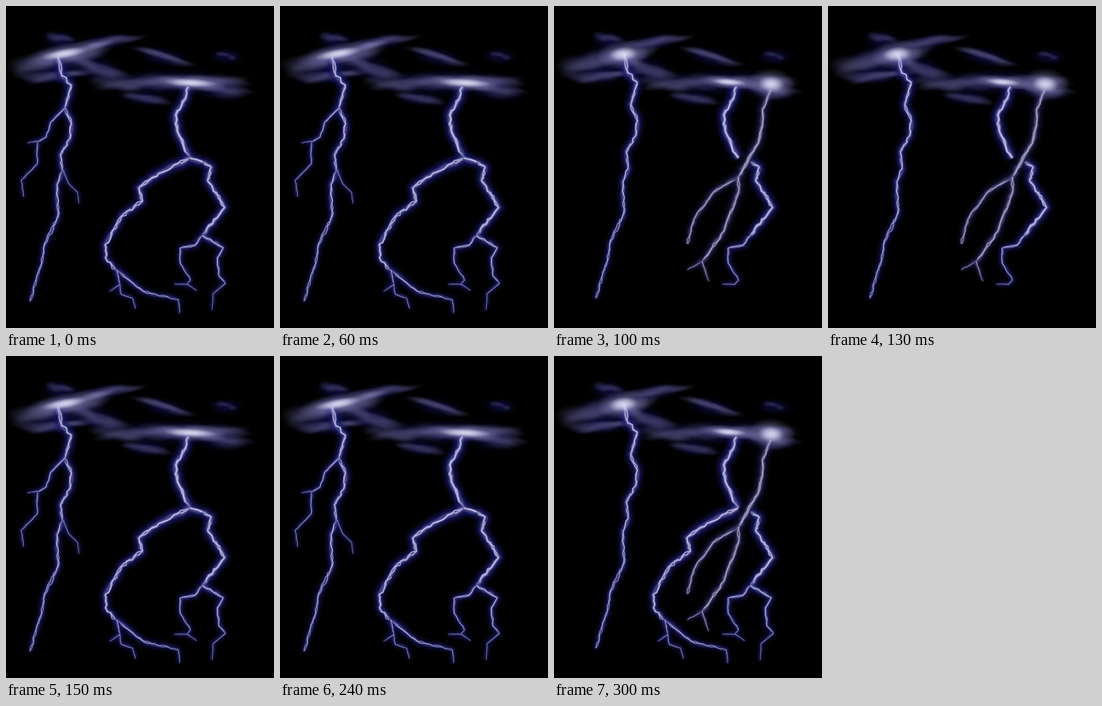
These frames come from a looping animation (360 by 432 pixels, 330 ms). An HTML page with a canvas:

```html
<!DOCTYPE html>
<html lang="en">
<head>
<meta charset="utf-8">
<title>Lightning</title>
<style>
html, body { margin: 0; height: 100%; overflow: hidden; background: #000; }
canvas { display: block; }
</style>
</head>
<body>
<canvas id="stage" width="360" height="432"></canvas>
<script>
const view = document.getElementById('stage').getContext('2d');
const HAZE = '92,88,134', FRINGE = '16,16,84', GLOW = '150,146,200', HOT = '236,234,255';
const BLUE = ['rgba(22,22,100,.75)', 'rgba(84,82,146,.85)', 'rgba(188,186,228,.8)'];
const GREY = ['rgba(28,26,74,.6)', 'rgba(82,78,122,.85)', 'rgba(166,163,196,.75)'];
let ctx, seed;

function random() {
  seed = (seed * 16807) % 2147483647;
  return seed / 2147483647 - 0.5;
}

// Soft ellipse
function puff(x, y, rx, ry, tilt, rgb, alpha) {
  ctx.save();
  ctx.translate(x, y);
  ctx.rotate(tilt);
  ctx.scale(rx, ry);
  const g = ctx.createRadialGradient(0, 0, 0, 0, 0, 1);
  for (let k = 0; k <= 1; k += 0.25) {
    g.addColorStop(k, `rgba(${rgb},${alpha * (1 - k * k) ** 1.5})`);
  }
  ctx.fillStyle = g;
  ctx.fillRect(-1, -1, 2, 2);
  ctx.restore();
}

// Wisps scattered along a line, with a dark blue rim
function wisps(x1, y1, x2, y2, thick) {
  const len = Math.hypot(x2 - x1, y2 - y1), tilt = Math.atan2(y2 - y1, x2 - x1);
  const n = Math.ceil(len / 9), rx = Math.min(26, len / 2);
  puff((x1 + x2) / 2, (y1 + y2) / 2, len / 2 + 16, thick * 1.9, tilt, FRINGE, .6);
  seed = 4321 + x1 * 7;
  for (let i = 0; i <= n; i++) {
    const k = i / n;
    puff(x1 + (x2 - x1) * k, y1 + (y2 - y1) * k + random() * thick,
      rx * (1 + random() * .4), thick * (.8 + random() * .5), tilt + random() * .3, HAZE, .32);
  }
}

function clouds() {
  wisps(24, 84, 126, 58, 13);
  wisps(62, 44, 84, 46, 7);
  wisps(112, 51, 164, 44, 6);
  wisps(34, 97, 100, 89, 7);
  wisps(100, 78, 150, 92, 10);
  wisps(130, 104, 310, 101, 10);
  wisps(168, 122, 208, 126, 6);
  wisps(188, 63, 236, 74, 7);
  wisps(288, 67, 304, 68, 6);
  wisps(262, 109, 314, 115, 9);
}

// Adds small kinks between the key points
function jagged(pts, rough) {
  const out = [pts[0]];
  for (let i = 1; i < pts.length; i++) {
    const [ax, ay] = pts[i - 1], [bx, by] = pts[i];
    const n = Math.ceil(Math.hypot(bx - ax, by - ay) / 6);
    for (let k = 1; k <= n; k++) {
      const r = k < n ? rough : rough / 3;
      out.push([ax + (bx - ax) * k / n + random() * r, ay + (by - ay) * k / n + random() * r]);
    }
  }
  return out;
}

// Tapered strip along the points
function ribbon(pts, w0, w1, color, blur) {
  const left = [], right = [], last = pts.length - 1;
  pts.forEach(([x, y], i) => {
    const a = pts[Math.max(0, i - 1)], b = pts[Math.min(last, i + 1)];
    const dx = b[0] - a[0], dy = b[1] - a[1];
    const s = (w0 + (w1 - w0) * i / last) / 2 / (Math.hypot(dx, dy) || 1);
    left.push([x - dy * s, y + dx * s]);
    right.unshift([x + dy * s, y - dx * s]);
  });
  ctx.filter = `blur(${blur}px)`;
  ctx.fillStyle = color;
  ctx.beginPath();
  left.concat(right).forEach(p => ctx.lineTo(...p));
  ctx.fill();
  ctx.filter = 'none';
}

// A halo, a soft body and two thin strands that cross each other
function bolt(path, w0, w1, [halo, body, core] = BLUE) {
  const pts = path.split(' ').map(p => p.split(',').map(Number));
  seed = 977 + pts[0][0] * 31;
  const line = jagged(pts, 2);
  ribbon(line, w0 * 2 + 4, w1 * 2 + 3, halo, 2.5);
  ribbon(line, w0, w1, body, .8);
  for (let i = 0; i < 2; i++) {
    ribbon(jagged(pts, w0 * .7), w0 * .3, w1 * .4, core, .4);
  }
}

function trunk() {
  bolt('70,68 75,94 88,106 79,136 88,158 86,178 73,200 76,222 68,240 70,282 50,325 48,345 32,396', 6, 2);
}

function trunkTwigs() {
  bolt('79,137 60,156 54,176 42,182 42,212 20,234 24,256', 3, 1);
  bolt('42,181 29,184', 1.5, .8);
  bolt('77,220 84,238 96,250 98,265', 1.6, .8);
}

function stem() {
  bolt('245,108 241,124 228,146 230,168 247,204', 6.5, 6.5);
}

function longArm() {
  bolt('247,204 205,225 178,244 183,262 155,282 133,320 134,338 148,354', 7, 4);
  bolt('148,354 185,383 232,394 233,412', 4, 1);
  bolt('149,354 153,374 155,387 170,392 174,406', 2.4, 1);
  bolt('153,374 139,383', 1.6, .8);
}

function rightArm() {
  bolt('264,209 276,216 271,234 294,270 264,308', 6, 5.5);
  bolt('264,308 254,321 234,325 234,345 248,368 243,373 226,373', 3.6, 1);
}

function rightFork() {
  bolt('264,308 292,324 284,338 286,362 295,372', 4.2, 2);
  bolt('295,372 278,386 277,408', 1.6, .8);
  bolt('243,373 256,382', 1.2, .8);
}

function crossing() {
  bolt('291,112 280,140 280,160 274,184 248,229', 5, 6, GREY);
  bolt('248,229 214,250 188,286 179,319', 5, 3, GREY);
  bolt('248,229 248,250 228,302 200,342', 5, 4.5, GREY);
  bolt('200,342 179,354', 3, 1.2, GREY);
  bolt('199,342 208,369', 3, 1.2, GREY);
}

function flare(x, y, rx, ry, tilt) {
  puff(x, y, rx * 1.8, ry * 2, tilt, GLOW, .6);
  puff(x, y, rx, ry, tilt, HOT, .8);
}

function scene(draw) {
  const layer = new OffscreenCanvas(360, 432);
  ctx = layer.getContext('2d');
  ctx.fillRect(0, 0, 360, 432);
  clouds();
  draw();
  return layer;
}

const strike = scene(() => {
  [trunk, trunkTwigs, stem, longArm, rightArm, rightFork].forEach(part => part());
  bolt('247,204 264,209', 6, 6);
  flare(78, 64, 32, 7, -.18);
  flare(248, 103, 36, 6, .05);
  puff(118, 54, 30, 6, -.25, GLOW, .5);
});

function late(...extra) {
  ctx.save();
  ctx.translate(24, -4);
  trunk();
  ctx.restore();
  [stem, rightArm, ...extra, crossing].forEach(part => part());
  flare(93, 65, 20, 10, -.1);
  flare(235, 102, 24, 5, .08);
  flare(292, 105, 18, 11, .08);
}

const flicker = scene(() => late());
const flash = scene(() => late(longArm, rightFork));

function play() {
  const t = performance.now() % 330;
  view.drawImage(t >= 300 ? flash : t >= 100 && t < 150 ? flicker : strike, 0, 0);
  requestAnimationFrame(play);
}
play();
</script>
</body>
</html>
```
